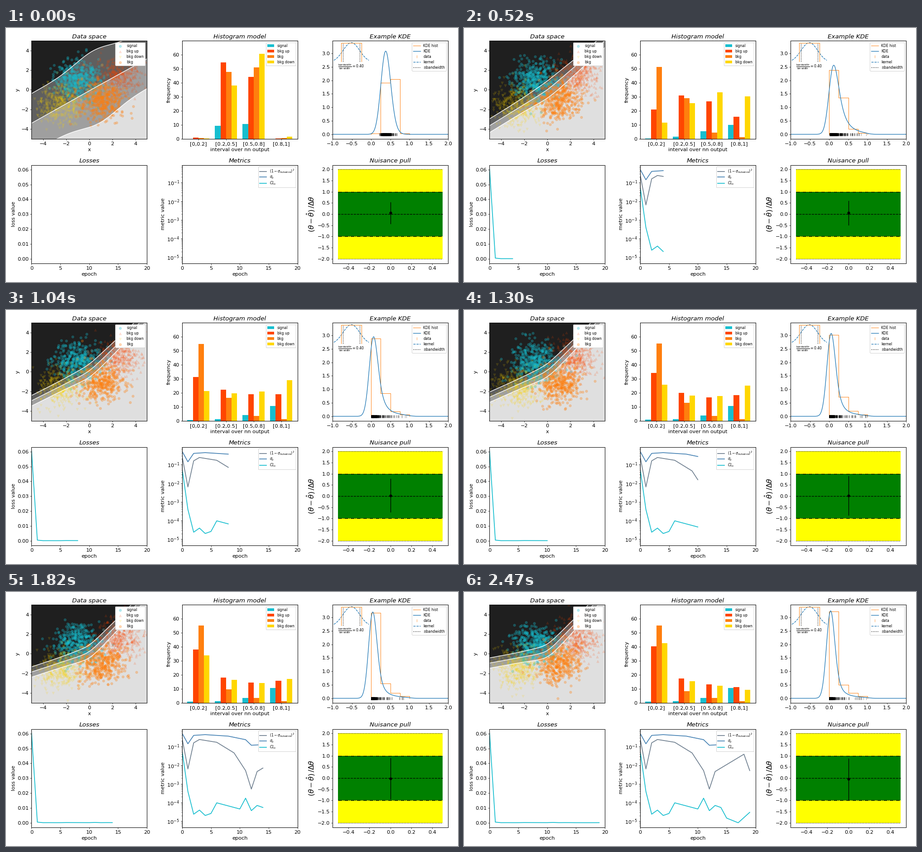
These frames come from a looping animation (998x561 px, 2600 ms). A matplotlib script:

```python
import numpy as np
import matplotlib.pyplot as plt
from matplotlib.animation import FuncAnimation

DPI, W, H = 62.375, 998, 561
EPOCHS, STEP = 20, 130
CYAN, RED, ORANGE, GOLD, BLUE = "C9", "orangered", "C1", "gold", "C0"
SMALL = "x-small"

plt.rcParams.update({
    "font.family": "DejaVu Sans",
    "font.size": 13,
    "axes.linewidth": 1.2,
    "legend.fontsize": SMALL,
    "legend.framealpha": 1,
    "legend.labelspacing": .37,
})


def settle(n, start, end, tau, hump=0):
    """Decay from start to end, with an optional rise and fall on the way."""
    return end + (start - end + hump * n) * np.exp(-n / tau)


def gauss(x, mu, s):
    return np.exp(-.5 * ((x - mu) / s) ** 2)


def powers(points):
    """Values per epoch, from key points given as epoch: power of ten."""
    return 10 ** np.interp(range(EPOCHS), list(points), list(points.values()))


NUISANCE = powers({0: -.56, 1: -2.2, 2: -.8, 3: -.62, 6: -.77, 9: -1.34,
                   11: -2.29, 12: -3.28, 13: -2.34, 18: -1.41, 19: -2.29})
SIGMA_MU = powers({0: -.29, 1: -.85, 2: -.4, 4: -.36, 8: -.44, 11: -.63,
                   12: -.93, 19: -.8})
CLS = powers({0: -1.22, 1: -3.41, 2: -4.63, 3: -4.41, 4: -4.7, 5: -4.59,
              6: -4.02, 10: -4.35, 11: -3.77, 12: -4.44, 13: -4.16,
              14: -4.27, 15: -4.84, 17: -5.09, 19: -4.53})

# How each bar settles, one entry per bin: start, end, tau, hump.
SAMPLES = {
    "signal": (CYAN, [(.1, 1.3, 12), (9.3, 1.4, 1), (10.6, 3.6, 3), (0, 10.5, 1.3)]),
    "bkg up": (RED, [(1, 42, 6), (54.5, 17, 4), (44.2, 12.6, 5), (.4, 0, 8, 6.4)]),
    "bkg": (ORANGE, [(.6, 55, 1.5), (47.8, 8, 3, 10), (51, 3.5, 1), (.6, 1.3, 3)]),
    "bkg down": (GOLD, [(.2, 90, 30), (37.9, 15, 5), (60.5, 11, 5), (1.5, 0, 5.5, 15.3)]),
}


def boundary(n, x, side):
    """Bent middle line (side 0) or the border above (1) or below (-1) it."""
    left = .86 - .034 * n - .2 * np.exp(-n)
    right = settle(n, .65, 1.22, 4)
    y = -.1 + .012 * n + left * x + (right - left) * .3 * np.logaddexp(0, x / .3)
    gap = settle(n, 3.35, .58, 1.5) * (.9 + .25 * gauss(x, .6 - .3 * side, 1.5))
    return y + side * gap


fig = plt.figure(figsize=(W / DPI, (H + .001) / DPI), dpi=DPI, facecolor="white")


def panel(col, row, title, xlabel="", ylabel="", **limits):
    left, bottom = 56.45 + 332.45 * col, 244.9 + 274.65 * row
    ax = fig.add_axes([left / W, 1 - bottom / H, 254.7 / W, 217 / H])
    ax.set_title(title, style="italic")
    ax.set(xlabel=xlabel, ylabel=ylabel, **limits)
    return ax


# Data space
ax = panel(0, 0, "Data space", "x", "y", xlim=(-5, 5), ylim=(-5, 5))
ax.set_facecolor("#1f1f1f")
ax.set_xticks(range(-4, 5, 2))
ax.set_yticks(range(-4, 5, 2))
grid = np.linspace(-5, 5, 201)
borders = []
for side, grey in ((1, "#5f5f5f"), (0, "#9f9f9f"), (-1, "#dfdfdf")):
    fill, = ax.fill([0, 0, 0], [0, 0, 0], color=grey, lw=0, zorder=.5)
    line, = ax.plot([], [], color="white", lw=1.6)
    borders.append((side, fill, line))
clouds = []
for label, center, color, marker, alpha in (
        ("signal", (-1, 1), CYAN, "o", .3),
        ("bkg up", (2.5, 1.5), RED, "^", .13),
        ("bkg down", (-2.5, -1.5), GOLD, "v", .13),
        ("bkg", (1, -1), ORANGE, "o", .3)):
    dots = ax.scatter([], [], color=color, marker=marker, alpha=alpha, label=label)
    clouds.append((dots, center))
ax.legend(loc="upper right")

# Histogram model
ax = panel(1, 0, "Histogram model", "interval over nn output", "frequency",
           xlim=(-.59, 3.59), ylim=(0, 69.9))
bars = {name: ax.bar(np.arange(4) - .3 + .2 * k, np.zeros(4), .2, color=color, label=name)
        for k, (name, (color, _)) in enumerate(SAMPLES.items())}
ax.set_xticks(range(4), ["[0,0.2]", "[0.2,0.5]", "[0.5,0.8]", "[0.8,1]"])
ax.legend(loc="upper right")

# Example KDE
ax = panel(2, 0, "Example KDE", xlim=(-1, 2), ylim=(-.17, 3.475))
edges = np.repeat(np.linspace(0, 1, 5), 2)
kde_x = np.linspace(-1, 2, 301)
hist, = ax.plot([], [], color=ORANGE, lw=1.1, label="KDE hist")
kde, = ax.plot([], [], color=BLUE, label="KDE")
rug, = ax.plot([], [], "|", color="black", ms=6, mew=1, alpha=.45)
data_key, = ax.plot([], [], "|", color=ORANGE, ms=6, mew=1, alpha=.8, label="data")
mid, bw, half = -.515, .216, .268
bell_x = np.linspace(mid - .455, mid + .455, 80)
bell, = ax.plot(bell_x, 2.665 + .735 * gauss(bell_x, mid, bw), "--",
                color=BLUE, label="kernel")
ax.plot([mid - half] * 2 + [mid + half] * 2, [2.7, 3.39, 3.39, 2.7],
        color=ORANGE, lw=1.1)
for sign in (-1, 1):
    band, = ax.plot([mid + sign * bw] * 2, [2.7, 3.37], ":", color="black",
                    label="±bandwidth")
ax.text(-.523, 2.5, r"$\frac{\mathrm{bandwidth}}{\mathrm{bin\,width}}=0.40$",
        fontsize=SMALL, ha="center", va="center")
ax.legend(handles=[hist, kde, data_key, bell, band], loc="upper right")

# Losses
ax = panel(0, 1, "Losses", "epoch", "loss value",
           xlim=(0, 20), ylim=(-.00305, .0631))
ax.set_xticks(range(0, 21, 5))
curves = [(ax.plot([], [], color=CYAN, lw=2)[0], CLS)]

# Metrics
ax = panel(1, 1, "Metrics", "epoch", "metric value", xlim=(0, 20))
ax.set_yscale("log")
ax.set_ylim(10 ** -5.33, 10 ** -.056)
ax.set_xticks(range(0, 21, 5))
for values, color, label in (
        (NUISANCE, "slategray", r"$(1-\sigma_{\mathrm{nuisance}})^2$"),
        (SIGMA_MU, "steelblue", r"$\sigma_\mu$"),
        (CLS, CYAN, r"$CL_s$")):
    curves.append((ax.plot([], [], color=color, lw=2, label=label)[0], values))
ax.legend(loc="upper right", labelspacing=.12)

# Nuisance pull
ax = panel(2, 1, "Nuisance pull", xlim=(-.55, .55), ylim=(-2.2, 2.2))
ax.set_ylabel(r"$(\theta - \hat{\theta})\,/ \Delta \theta$", fontsize=18)
ax.set_yticks(np.arange(-2, 2.1, .5))
for size, color in ((2, "yellow"), (1, "green")):
    ax.fill_between([-.5, .5], -size, size, color=color, lw=0)
for y, style in ((-2, ":"), (2, ":"), (-1, "-."), (1, "-."), (0, "--")):
    ax.plot([-.5, .5], [y, y], style, color="black")
error, = ax.plot([], [], color="black")
point, = ax.plot([], [], "o", color="black", ms=6)


def update(n):
    rng = np.random.default_rng(100 + n)

    for side, fill, line in borders:
        y = boundary(n, grid, side)
        fill.set_xy(np.column_stack([np.r_[grid, 5, -5], np.r_[y, -9, -9]]))
        line.set_data(grid, y)
    for dots, center in clouds:
        dots.set_offsets(rng.normal(center, 1, (420, 2)))

    for name, (_, rules) in SAMPLES.items():
        for bar, rule in zip(bars[name], rules):
            bar.set_height(settle(n, *rule))

    nominal = np.array([bar.get_height() for bar in bars["bkg"]])
    density = 4 * nominal / nominal.sum()
    hist.set_data(edges, np.r_[0, np.repeat(density, 2), 0])

    # Network output on background is close to log-normal.
    median, spread = settle(n, .38, .03, 3.6), settle(n, .215, 1.65, 6)
    z = np.linspace(-3.5, 3.5, 211)
    weight = gauss(z, 0, 1)
    centers = median * np.exp(spread * z) % 1
    kernels = gauss(kde_x[:, None], centers, .1) / (.1 * np.sqrt(2 * np.pi))
    kde.set_data(kde_x, kernels @ weight / weight.sum())
    sample = median * np.exp(spread * rng.normal(size=400)) % 1
    rug.set_data(sample, np.zeros_like(sample))

    for line, values in curves:
        line.set_data(np.arange(n + 1), values[:n + 1])

    pull, sigma = .06 * np.cos(np.pi * n / 24), 1 - np.sqrt(NUISANCE[n])
    error.set_data([0, 0], [pull - sigma, pull + sigma])
    point.set_data([0], [pull])


anim = FuncAnimation(fig, update, frames=EPOCHS, init_func=lambda: None,
                     interval=STEP, repeat=True, repeat_delay=0)
plt.show()
```
